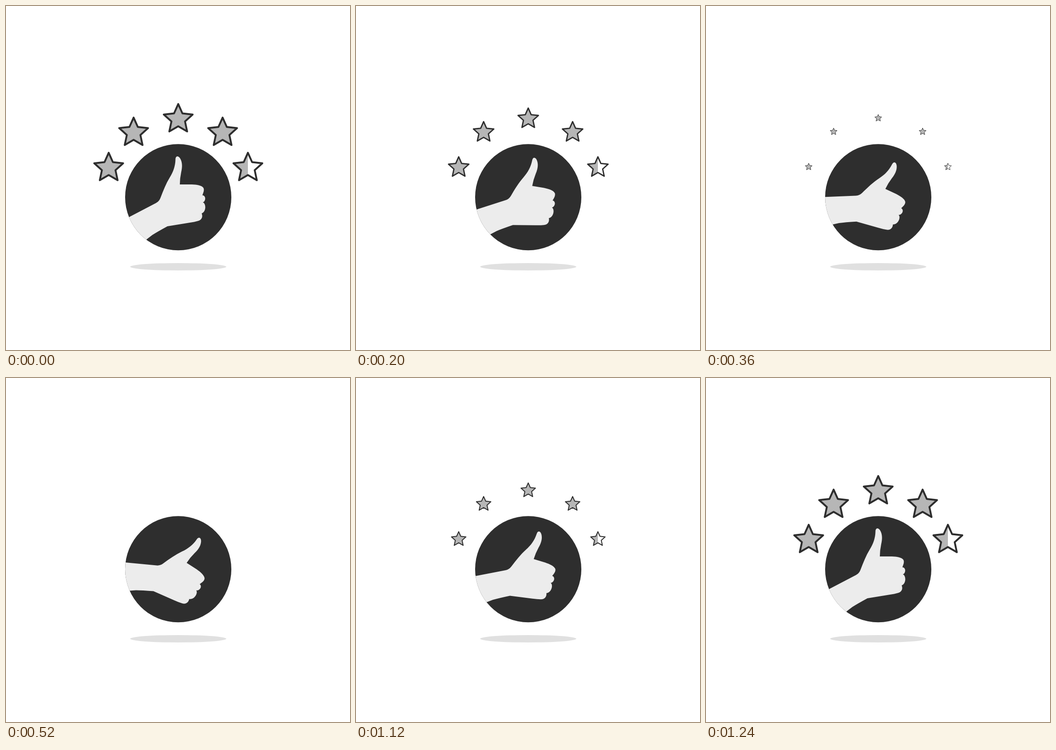
Write an HTML page that moves like this. It is 748x748 px and loops after 2 s.

```html
<!DOCTYPE html>
<html lang="en">
<head>
<meta charset="utf-8">
<title>Thumbs up rating</title>
<style>
  html, body { margin: 0; width: 100%; height: 100%; overflow: hidden; background: #fff; }
  svg { display: block; width: 100%; height: 100%; }
</style>
</head>
<body>
<svg viewBox="0 0 748 748">
  <defs>
    <clipPath id="disc"><circle cx="374.5" cy="415.8" r="115.5"/></clipPath>
    <linearGradient id="half">
      <stop offset=".5" stop-color="#b6b6b6"/>
      <stop offset=".5" stop-color="#fff"/>
    </linearGradient>
  </defs>
  <ellipse cx="374.5" cy="567" rx="104.5" ry="8" fill="#e0e0e0"/>
  <circle cx="374.5" cy="415.8" r="115.5" fill="#2e2e2e"/>
  <g clip-path="url(#disc)">
    <path id="hand" fill="#ececec" d="
      M230 478.5 L326 428.5 Q333 425 336 417
      C342 401 348 386 356 373 C364 360 368 348 368.5 334
      C368.5 325 375 325 379 332 C383 339 384 348 381 361
      Q378 375 378 388 L404 388 C415 388.5 425 390 429 395
      C432 400 429 406 427 411.5
      C435 412 435 424 428 427 C435 429 436 447 425.5 451
      C428 457 427 465 417 467.5 Q410 469.5 400 471 L351 479
      Q329 491 318 498 L270 535 L200 535 Z"/>
  </g>
  <g id="stars" stroke="#2d2d2d" stroke-width="4" stroke-linejoin="round"></g>
</svg>
<script>
const PERIOD = 2000, STEP = 40, TILT = 33;
const centres = [[223.3, 349], [277.5, 272.5], [374.5, 243], [471, 272.5], [526, 349]];
const hand = document.getElementById('hand');
const group = document.getElementById('stars');

// Five-pointed star, shifted down so that its bounding box is centred on the origin.
const starPoints = Array.from({ length: 10 }, (_, i) => {
  const radius = i % 2 ? 15.5 : 33;
  const angle = i * Math.PI / 5;
  return [radius * Math.sin(angle), 3.1 - radius * Math.cos(angle)].map(v => v.toFixed(2));
}).join(' ');

const stars = centres.map((_, i) => {
  const star = document.createElementNS('http://www.w3.org/2000/svg', 'polygon');
  star.setAttribute('points', starPoints);
  star.setAttribute('fill', i === 4 ? 'url(#half)' : '#b6b6b6');
  return group.appendChild(star);
});

function ease(time, start, end) {
  const u = Math.min(1, Math.max(0, (time - start) / (end - start)));
  return u * u * (3 - 2 * u);
}

function draw(now) {
  const time = Math.floor(now % PERIOD / STEP) * STEP;
  const rise = 1 - ease(time, 20, 520) + ease(time, 1000, 1240);
  hand.setAttribute('transform', `rotate(${TILT * (1 - rise)} 362 420)`);
  stars.forEach((star, i) =>
    star.setAttribute('transform', `translate(${centres[i]}) scale(${rise})`));
}

let start;
function tick(now) {
  start ??= now;
  draw(now - start);
  requestAnimationFrame(tick);
}
draw(0);
requestAnimationFrame(tick);
</script>
</body>
</html>
```
